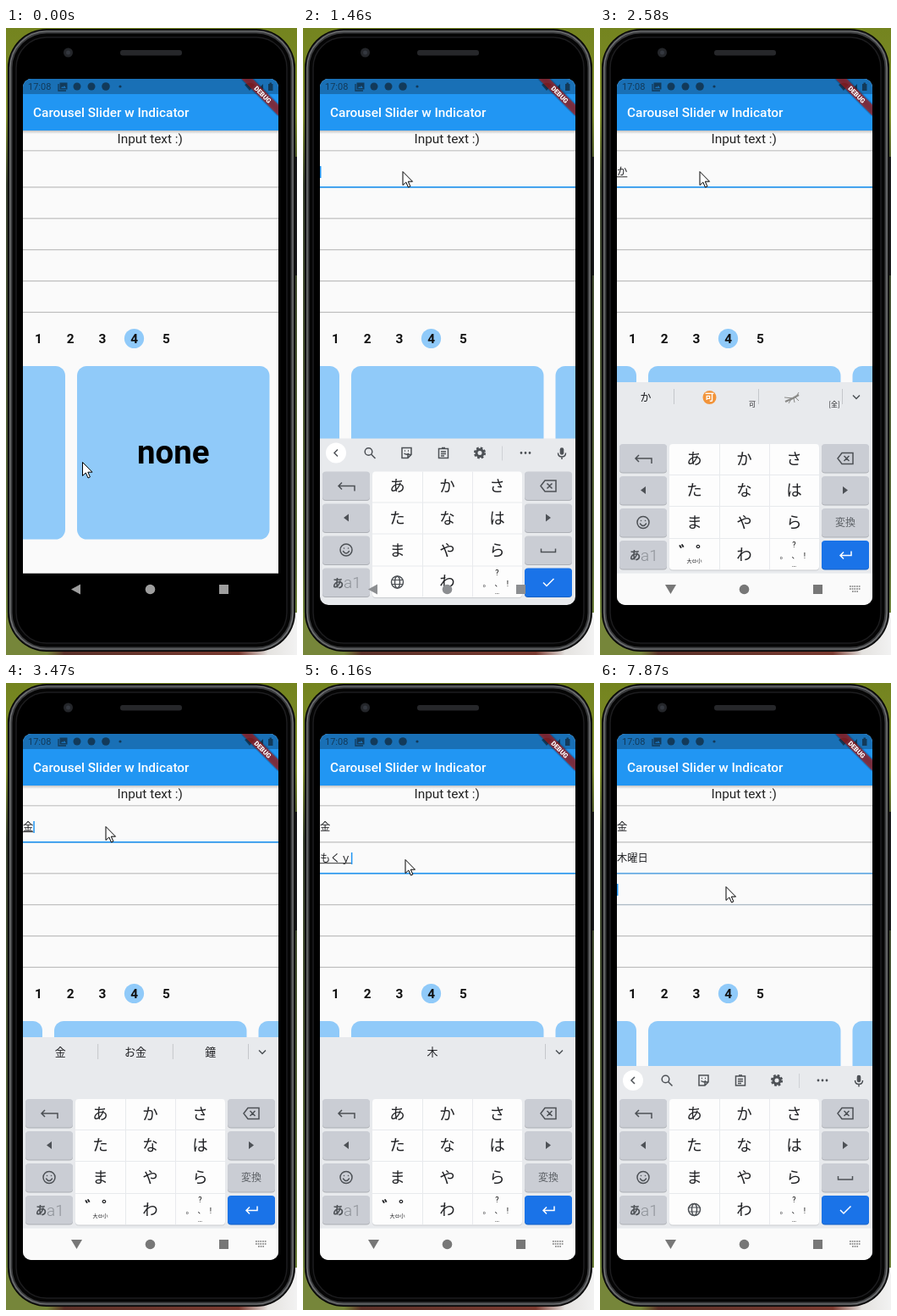
Write an HTML page that moves like this. It is 344 px wide and 740 px high and loops after 7990 ms.

```html
<!DOCTYPE html>
<html lang="en">
<head>
<meta charset="utf-8">
<title>Carousel Slider w Indicator</title>
<style>
html, body { margin: 0; width: 100%; height: 100%; overflow: hidden; background: #111; }
svg { display: block; width: 344px; height: 740px; }
text { font-family: Roboto, sans-serif; fill: #111; }
.mid { text-anchor: middle; }
.jp { font-family: "Noto Sans CJK JP", "Noto Sans CJK", sans-serif; fill: #202124; }
.ico { fill: none; stroke: #4d5156; stroke-width: 1.5; }
</style>
</head>
<body>
<svg viewBox="0 0 344 740" xmlns="http://www.w3.org/2000/svg">
  <defs>
    <linearGradient id="wall" x2="0" y2="1">
      <stop offset="0" stop-color="#74841f"/><stop offset=".14" stop-color="#7d8c2c"/>
      <stop offset=".25" stop-color="#3a4230"/><stop offset=".85" stop-color="#5a6a35"/>
      <stop offset="1" stop-color="#7f9440"/>
    </linearGradient>
    <linearGradient id="floor">
      <stop offset="0" stop-color="#76863a"/><stop offset=".14" stop-color="#76863a"/>
      <stop offset=".2" stop-color="#5a3028"/><stop offset=".8" stop-color="#7a3a30"/>
      <stop offset=".9" stop-color="#e4e2df"/><stop offset="1" stop-color="#f2f2f2"/>
    </linearGradient>
    <linearGradient id="shade" x2="0" y2="1">
      <stop offset="0" stop-opacity=".22"/><stop offset="1" stop-opacity="0"/>
    </linearGradient>
    <clipPath id="screen"><rect x="20" y="60" width="302" height="621" rx="10"/></clipPath>
    <filter id="soft"><feGaussianBlur stdDeviation="1.6"/></filter>
  </defs>

  <rect width="344" height="740" fill="url(#wall)"/>
  <rect y="690" width="344" height="50" fill="url(#floor)"/>
  <rect x="340" y="152" width="4" height="140" fill="#191a1b"/>
  <g fill="none">
    <rect x="2" y="1" width="340" height="735" rx="46" fill="#050505"/>
    <rect x="5.500" y="4.500" width="333" height="728" rx="42.500" stroke="#3b3c3e" stroke-width="4"/>
    <rect x="5" y="4" width="334" height="729" rx="43" stroke="#77797b" stroke-width="1.200"/>
    <rect x="12" y="11" width="320" height="715" rx="36" fill="#000" stroke="#1d1d1f" stroke-width="1.500"/>
  </g>
  <circle cx="73.500" cy="29" r="5.500" fill="#24262a"/><circle cx="73.500" cy="29" r="2.500" fill="#34383f"/>
  <rect x="135" y="26" width="73" height="6.500" rx="3" fill="#26272a"/>

  <g clip-path="url(#screen)">
    <rect x="20" y="60" width="302" height="584" fill="#fafafa"/>
    <rect x="20" y="121" width="302" height="4" fill="url(#shade)"/>
    <rect x="20" y="60" width="302" height="61" fill="#2196f3"/>
    <rect x="20" y="60" width="302" height="18" fill="#1970b6"/>
    <g fill="#123a5a">
      <text x="26" y="73" font-size="11" style="fill:#123a5a">17:08</text>
      <path d="M62 66v8h9" fill="none" stroke="#123a5a" stroke-width="1.300"/>
      <path d="M63.500 64.500h9v8h-9zm1.500 6.500h6l-2-3-1.500 2-1-1z" fill-rule="evenodd"/>
      <circle cx="84" cy="69" r="4.500"/><circle cx="101" cy="69" r="4.500"/>
      <circle cx="118" cy="69" r="4.800"/><circle cx="135" cy="69" r="1.600"/>
      <path d="M282 67q6-4.500 12 0l-6 7zM296 74h8v-8zM310 66h1.500v-1.500h2.500v1.500h1.500v8h-5.500z"/>
    </g>
    <text x="32" y="105.300" font-size="15.400" font-weight="500" style="fill:#fff">Carousel Slider w Indicator</text>
    <g transform="translate(322 60) rotate(45)">
      <rect x="-31" y="21.500" width="62" height="9.300" filter="url(#soft)" opacity=".5"/>
      <rect x="-31" y="21.500" width="62" height="9.300" fill="#b71c1c" fill-opacity=".63"/>
      <text class="mid" y="29" font-size="7.800" font-weight="900" style="fill:#fff">DEBUG</text>
    </g>

    <text class="mid" x="170.200" y="135.500" font-size="15.400" style="fill:#222">Input text :)</text>
    <rect x="20" y="144.200" width="302" height="1.200" fill="#c2c2c2"/>
    <g id="fields"></g>
    <circle cx="151.500" cy="366.500" r="11.600" fill="#90caf9"/>
    <g id="dots"></g>
    <g id="cards" fill="#90caf9">
      <rect x="-184.500" y="399" width="227.500" height="204.500" rx="11.500"/>
      <rect x="57" y="399" width="227.500" height="204.500" rx="11.500"/>
      <rect x="298.500" y="399" width="227.500" height="204.500" rx="11.500"/>
      <text class="mid" x="170.700" y="514" font-size="38.400" font-weight="700" style="fill:#000">none</text>
    </g>

    <rect id="bar" x="20" y="643.700" width="302" height="38"/>
    <g id="keyboard">
      <rect x="20" y="452" width="302" height="240" fill="#e8eaed"/>
      <g id="tools" class="ico">
        <circle cx="39" cy="469" r="12" fill="#fff" stroke="none"/>
        <path d="M41 465l-4 4 4 4"/>
        <circle cx="77.500" cy="467.500" r="4.300"/><path d="M80.500 470.500l5 5"/>
        <path d="M117 463h11v8l-4 4h-7zM128 471h-4v4M120 466.500h1M124 466.500h1M119.500 469.500q3 2.500 5.500 0"/>
        <path d="M160.500 464h11v11h-11zM164 463h4M163 467.500h6M163 470h6M163 472.500h4"/>
        <circle cx="209" cy="469" r="4" stroke-width="3"/>
        <circle cx="209" cy="469" r="6" stroke-width="2.200" stroke-dasharray="2.700 2.010"/>
        <path d="M235.500 461v17" stroke="#cfd2d6" stroke-width="1"/>
        <path d="M258 469h.01M263 469h.01M268 469h.01" stroke-width="2.800" stroke-linecap="round"/>
        <path d="M306 465v4" stroke-width="4.600" stroke-linecap="round"/>
        <path d="M301.500 469q0 4.500 4.500 4.500t4.500-4.500M306 473.500v3"/>
      </g>
      <g id="keys"></g>
      <g class="ico">
        <path d="M61 514v-6h-19m4-4l-4 4 4 4"/>
        <path d="M54 541v9l-6-4.500zM287 541v9l6-4.500z" fill="#4d5156" stroke="none"/>
        <circle cx="51" cy="583.500" r="7"/><path d="M47.500 585q3.500 5 7 0M48.500 581.500h.01M53.500 581.500h.01" stroke-linecap="round"/>
        <path d="M281 508l5-6.500h13v13h-13zM288.500 505l6 6m0-6l-6 6"/>
      </g>
      <text class="jp mid" x="41.500" y="627" font-size="13.500" font-weight="700" style="fill:#4d5156">あ</text>
      <text x="48" y="628.500" font-size="19" font-weight="300" style="fill:#8d9197">a1</text>
      <g class="mid">
        <text x="229.500" y="613" font-size="9">?</text>
        <text class="jp" x="217" y="626" font-size="9">。</text>
        <text class="jp" x="231" y="626" font-size="9">、</text>
        <text x="242" y="626" font-size="9">!</text>
        <text x="229.500" y="635.500" font-size="8">…</text>
      </g>
      <g id="plain" class="ico">
        <circle cx="111.500" cy="621.500" r="7"/><ellipse cx="111.500" cy="621.500" rx="3" ry="7"/>
        <path d="M105 619h13M105 624h13" stroke-width="1.200"/>
        <path d="M281.500 582v4h17v-4"/>
        <path d="M284 622l4 4 8.500-8.500" stroke="#fff"/>
      </g>
      <g id="compose">
        <text class="jp mid" x="113" y="627" font-size="20" font-weight="700">゛゜</text>
        <text class="jp mid" x="111.500" y="631" font-size="6">大⇔小</text>
        <text class="jp mid" x="290" y="588" font-size="12" style="fill:#5f6368">変換</text>
        <path d="M297 617.500v5h-13m4-4l-4 4 4 4" fill="none" stroke="#fff" stroke-width="1.500"/>
        <rect x="20" y="418" width="302" height="71" fill="#e8eaed"/>
        <path d="M286.500 426v18" stroke="#c4c7cb"/>
        <path class="ico" d="M299 433.500l4 4 4-4"/>
        <g id="words"></g>
        <g id="first">
          <path d="M87.500 426v18M187.500 426v18" stroke="#c4c7cb"/>
          <circle cx="129.500" cy="436" r="8" fill="#f2943a"/>
          <text class="jp mid" x="129.500" y="440" font-size="11" font-weight="700" style="fill:#fff">可</text>
          <text class="jp mid" x="180" y="446.500" font-size="8">可</text>
          <text class="jp mid" x="277" y="446.500" font-size="8">[全]</text>
          <g fill="none" stroke="#8a8a88">
            <path d="M219 441l9-4 7-4" stroke-width="2.200"/>
            <path d="M218 436l10 1M226 438l-3 5M229 437l1 5M231 436l4 4M233 433l2-3"/>
          </g>
        </g>
      </g>
    </g>
    <g id="nav">
      <path id="back" d="M88 656.500v12l-11-6z"/>
      <circle cx="170.500" cy="662.500" r="5.800"/>
      <rect x="252" y="657" width="11" height="11"/>
      <path id="switch" d="M295 659h13M295 662h13M298 665h7" fill="none" stroke="#777" stroke-width="1.500" stroke-dasharray="1.700 1"/>
    </g>
  </g>
  <path id="mouse" d="M.5.5v16l3.800-3.500 2.700 6 2.400-1.100-2.600-5.700h5.200z" fill="#fff" stroke="#000" stroke-width="1"/>
</svg>
<script>
const $ = id => document.getElementById(id);
const show = (id, on) => $(id).setAttribute('display', on ? 'inline' : 'none');
const move = (id, x, y) => $(id).setAttribute('transform', `translate(${x} ${y})`);
const jp = (s, x, y, size) =>
  `<text class="jp mid" x="${x}" y="${y + size * .37}" font-size="${size}">${s}</text>`;

$('dots').innerHTML = [1, 2, 3, 4, 5].map(n =>
  `<text class="mid" x="${.8 + n * 37.7}" y="372" font-size="15.4" font-weight="700">${n}</text>`).join('');

const key = (x, row, fill) =>
  `<rect x="${x}" y="${492 + row * 38}" width="56" height="33.5" rx="4" fill="${fill}"/>
   <rect x="${x}" y="${492 + row * 38}" width="56" height="33.5" rx="4" opacity=".15"/>
   <rect x="${x}" y="${491 + row * 38}" width="56" height="33.5" rx="4" fill="${fill}"/>`;
let keys = `<rect x="82" y="492" width="177" height="148.500" rx="4" fill="#c9ccd0"/>
  <rect x="82" y="491" width="177" height="148.500" rx="4" fill="#fdfdfd"/>
  <path d="M141.500 491v148M200.500 491v148M82 527.500h177M82 564.500h177M82 602.500h177" stroke="#e8eaed"/>`;
['あかさ', 'たなは', 'まやら', ' わ'].forEach((row, r) => {
  keys += key(23, r, '#cacdd4') + key(262, r, r < 3 ? '#cacdd4' : '#1a73e8');
  [...row].forEach((c, i) => keys += jp(c, 111.5 + i * 59, 508 + r * 37.6, 18.5));
});
$('keys').innerHTML = keys;

// each beat patches the state from its time on
const start = { kb: 260, light: false, text: ['', '', ''], focus: [0, 0, 0], caret: -1, under: -1, cand: null, x: 117.5, y: 169 };
const beats = [
  [1100, { focus: [.5, 0, 0] }],
  [1220, { focus: [1, 0, 0], caret: 0 }],
  [1340, { kb: 115 }],
  [1460, { kb: 32.5 }],
  [1580, { kb: 7 }],
  [1700, { kb: 0, light: true }],
  [1820, { text: ['ｋ', '', ''], under: 0 }],
  [1940, { cand: ['か'] }],
  [2190, { text: ['か', '', ''] }],
  [2580, { caret: -1 }],
  [3110, { text: ['かｎ', '', ''], caret: 0 }],
  [3230, { text: ['かね', '', ''], cand: ['金', '鐘', 'かね'] }],
  [3350, { cand: ['金', 'お金', '鐘'] }],
  [3470, { text: ['金', '', ''] }],
  [3620, { under: -1, cand: null }],
  [4050, { caret: -1, x: 118, y: 172 }],
  [4170, { x: 119, y: 178 }],
  [4320, { x: 120.5, y: 208 }],
  [4600, { caret: 0 }],
  [4720, { caret: 1, focus: [.6, .2, 0] }],
  [4840, { focus: [0, 1, 0] }],
  [5090, { caret: -1 }],
  [5650, { text: ['金', 'ｍ', ''], caret: 1, under: 1 }],
  [5770, { text: ['金', 'も', ''], cand: ['も', 'もう', '藻'] }],
  [5890, { text: ['金', 'もｋ', ''] }],
  [6040, { text: ['金', 'もく', ''], cand: ['木', '目'] }],
  [6160, { text: ['金', 'もくｙ', ''], cand: ['木'] }],
  [6280, { text: ['金', 'もくよ', ''], cand: ['木曜', '木曜日'] }],
  [6430, { text: ['金', 'もくよう', ''], cand: ['木曜日', '木曜'] }],
  [6570, { text: ['金', 'もくようび', ''], cand: ['木曜日'] }],
  [6690, { text: ['金', '木曜日', ''] }],
  [6810, { under: -1, cand: null }],
  [7180, { caret: -1, x: 124, y: 208 }],
  [7330, { x: 151, y: 265 }],
  [7480, { x: 151, y: 250 }],
  [7630, { x: 148.5, y: 240 }],
  [7750, { caret: 1 }],
  [7870, { caret: 2, focus: [0, .65, .1] }]
];

const em = 12.3;
function field(s, i) {
  const y = 169.5 + i * 37, w = (s.text[i] || '').length * em, f = s.focus[i] || 0;
  const line = 187.3 + i * 36.9;
  let out = `<rect x="20" y="${line}" width="302" height="1.2" fill="#bdbdbd"/>`;
  if (f) out += `<rect x="20" y="${line - .3}" width="302" height="1.6" fill="#2196f3" opacity="${f}"/>`;
  if (w) out += `<text class="jp" x="20" y="${y + 4.5}" font-size="${em}">${s.text[i]}</text>`;
  if (s.under === i) out += `<rect x="20" y="${y + 5.7}" width="${w}" height="1" fill="#333"/>`;
  if (s.caret === i) out += `<rect x="${20 + w}" y="${y - 6.5}" width="1.5" height="14" fill="#2196f3"/>`;
  return out;
}

function words(list) {
  if (list[0] === 'か') return jp('か', 54, 435.5, 13);
  const w = 266 / list.length;
  return list.map((s, i) => (i ? `<path d="M${20 + w * i} 426v18" stroke="#c4c7cb"/>` : '')
    + jp(s, 20 + w * (i + .5), 435.5, 13)).join('');
}

function draw(t) {
  const s = { ...start };
  for (const [at, patch] of beats) if (t >= at) Object.assign(s, patch);

  const p = Math.min(1, Math.floor(t / 120) / 6), left = (1 - p) ** 3;
  const ease = p * p * (3 - 2 * p);
  move('cards', 27 * left, 0);
  if (p < 1) { s.x = 90 + 27.5 * ease; s.y = 512 - 343 * ease; }
  move('mouse', s.x, s.y);

  $('fields').innerHTML = [0, 1, 2, 3, 4].map(i => field(s, i)).join('');
  move('keyboard', 0, s.kb);
  show('keyboard', s.kb < 240);
  show('compose', s.cand);
  show('plain', !s.cand);
  show('tools', !s.cand);
  $('words').innerHTML = s.cand ? words(s.cand) : '';
  show('first', s.cand && s.cand[0] === 'か');

  // the keyboard ends above the light navigation bar once it has settled
  $('keyboard').parentNode.insertBefore($('bar'), s.light ? $('nav') : $('keyboard'));
  $('bar').setAttribute('fill', s.light ? '#fafafa' : '#000');
  $('nav').setAttribute('fill', s.light ? '#777' : s.kb < 240 ? '#8c8e91' : '#9e9e9e');
  $('back').setAttribute('d', s.light ? 'M77 657h13l-6.500 11z' : 'M88 656.500v12l-11-6z');
  show('switch', s.light);
}

let last;
function tick() {
  const t = performance.now() % 7990, step = Math.floor(t / 10);
  if (step !== last) draw(step * 10);
  last = step;
  requestAnimationFrame(tick);
}
tick();
</script>
</body>
</html>
```
